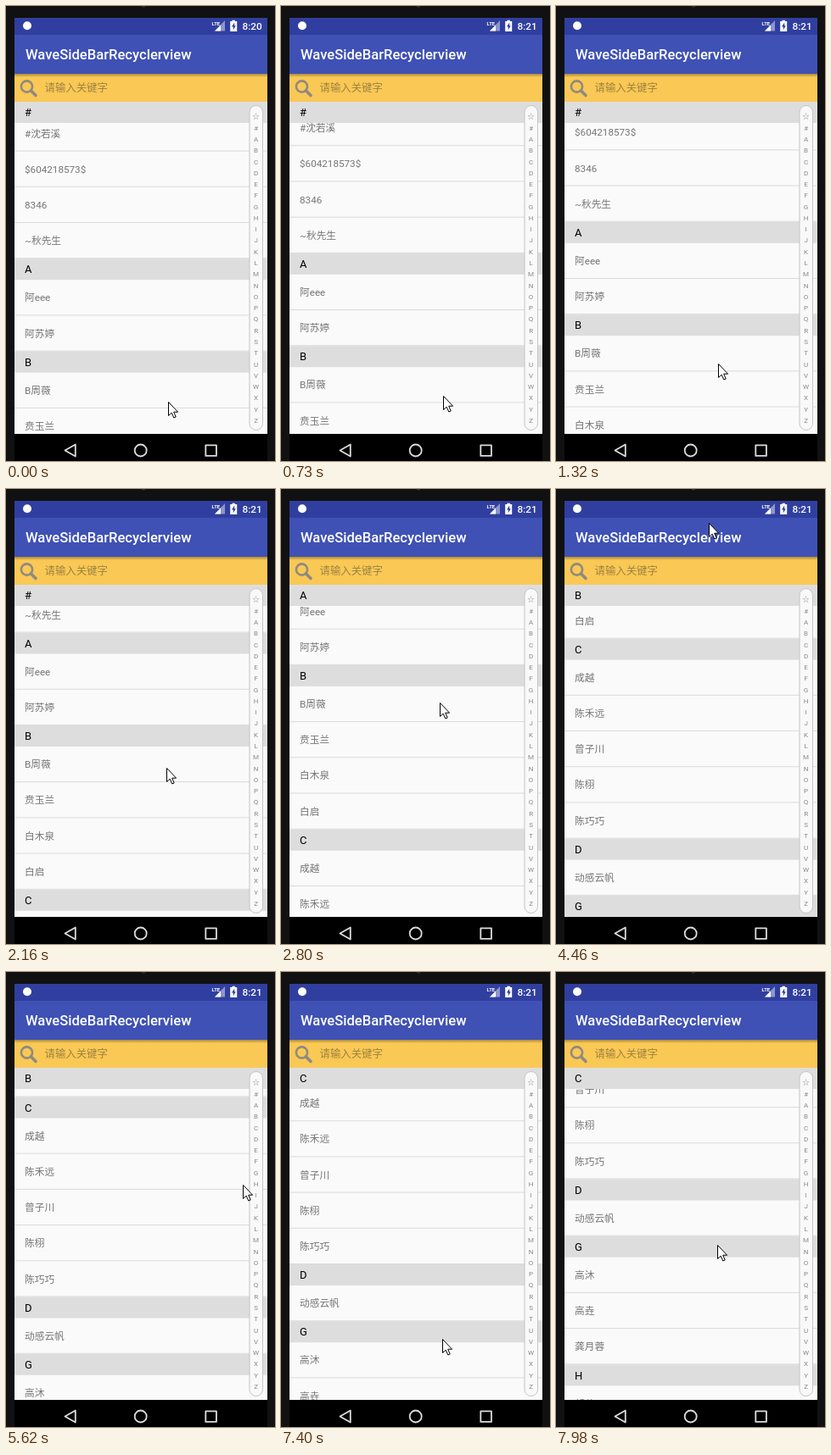
Animation, 317 px wide and 537 px high, one loop 8000 ms. Source, as an HTML page:

```html
<!DOCTYPE html>
<html lang="zh">
<head>
<meta charset="utf-8">
<title>WaveSideBarRecyclerview</title>
<style>
  html, body { margin: 0; height: 100%; overflow: hidden; background: #111; }
  svg { display: block; width: 100%; height: 100%; font-family: Roboto, "Noto Sans CJK SC", "Noto Sans CJK", sans-serif; }
  .row { font-size: 11.7px; fill: #757575; }
  .head { font-size: 13px; fill: #000; }
  .side { font-size: 8px; fill: #888; text-anchor: middle; }
</style>
</head>
<body>
<svg viewBox="0 0 317 537">
  <defs>
    <clipPath id="clip"><rect x="10" y="113" width="298" height="392"/></clipPath>
    <linearGradient id="shade" x2="0" y2="1">
      <stop stop-color="#5a4a20" stop-opacity=".5"/>
      <stop offset="1" stop-color="#5a4a20" stop-opacity="0"/>
    </linearGradient>
  </defs>
  <rect width="317" height="537" fill="#111"/>
  <circle cx="162" cy="-1" r="2.5" fill="#333"/>

  <!-- status bar and toolbar -->
  <rect x="10" y="14" width="298" height="20" fill="#303f9f"/>
  <rect x="10" y="34" width="298" height="46" fill="#3f51b5"/>
  <g fill="#fff">
    <circle cx="25" cy="23.3" r="5"/>
    <path d="M258 17V29.5H246Z" fill-opacity=".45"/>
    <path d="M253 22.5V29.5H246Z"/>
    <text x="242.5" y="22.5" font-size="6" font-weight="700">LTE</text>
    <path d="M266.5 18v-1.2h3.4V18h2.3v12h-8V18z"/>
    <path d="M269.2 19.5l-3.2 5h1.8v3.8l3-5h-1.6z" fill="#303f9f"/>
    <text id="clock" x="278.5" y="28" font-size="11.8" font-weight="500">8:20</text>
    <text x="23" y="63" font-size="16.6" font-weight="500">WaveSideBarRecyclerview</text>
  </g>

  <!-- search field -->
  <rect x="10" y="80" width="298" height="33" fill="#f9c855"/>
  <rect x="10" y="80" width="298" height="4" fill="url(#shade)"/>
  <g fill="none" stroke="#8f8a80">
    <circle cx="24.5" cy="95" r="6.6" stroke-width="2.6"/>
    <path d="M29.5 100l5.5 5.5" stroke-width="3.6" stroke-linecap="round"/>
  </g>
  <text x="45.5" y="101.4" font-size="12.4" fill="#9d8240">请输入关键字</text>

  <!-- contact list -->
  <g clip-path="url(#clip)">
    <rect x="10" y="113" width="298" height="392" fill="#fafafa"/>
    <g id="list"></g>
    <g id="pin"></g>
  </g>
  <rect x="287" y="117.5" width="15.5" height="383" rx="7.75" fill="#f9f9f9" stroke="#c4c4c4"/>
  <g id="side"></g>

  <!-- navigation bar -->
  <rect x="10" y="505" width="298" height="32" fill="#000"/>
  <g fill="none" stroke="#dcdcdc" stroke-width="1.8" stroke-linejoin="round">
    <path d="M81.8 517.5v14L69.5 524.5z"/>
    <circle cx="158.7" cy="524.5" r="7"/>
    <rect x="235.3" y="518.3" width="12.6" height="12.6"/>
  </g>
  <path id="cursor" d="M.5 .5V16.5L4.2 13.2 6.8 19 9.2 18 6.7 12.2H11.6Z" fill="#fff" stroke="#000"/>
</svg>
<script>
const $ = id => document.getElementById(id);
const LOOP = 8000, TOP = 113, ROW = 42.2, HEAD = 25;
const groups = {
  '#': ['#沈若溪', '$604218573$', '8346', '~秋先生'],
  A: ['阿eee', '阿苏婷'],
  B: ['B周薇', '贲玉兰', '白木泉', '白启'],
  C: ['成越', '陈禾远', '曾子川', '陈栩', '陈巧巧'],
  D: ['动感云帆'],
  G: ['高沐', '高垚', '龚月蓉'],
  H: ['胡芷']
};

// Keys: [ms, scroll] and [ms, x, y]
const scrollKeys = [
  [0, 8.6], [650, 15], [1317, 52], [2799, 208.3], [3742, 340], [4420, 434],
  [4954, 462.5], [6900, 462.5], [7396, 501], [7942, 601.5], [LOOP, 601.5]
];
const cursorKeys = [
  [0, 191, 467], [650, 191, 460], [1317, 191, 422], [2799, 187, 252], [3742, 182, 127],
  [4340, 180, 51], [4700, 178, 0], [4900, 178, -25], [5619, 178, -25],
  [5620, 279, 251], [6166, 174, 434], [6440, 174, 434], [6800, 190, 473],
  [6900, 190, 473], [7396, 190, 433], [7942, 190, 322], [LOOP, 190, 322]
];

const label = (cls, x, y, s) => `<text class="${cls}" x="${x}" y="${y}">${s}</text>`;
const header = (y, s) =>
  `<rect x="10" y="${y}" width="298" height="${HEAD}" fill="#ddd"/>` + label('head', 22, y + 17.2, s);

const heads = [];
let y = TOP, html = '';
for (const [key, names] of Object.entries(groups)) {
  heads.push({ key, y: y - TOP });
  html += header(y, key);
  y += HEAD;
  for (const name of names) {
    html += label('row', 22, y + 25.2, name) +
      `<rect x="10" y="${y + ROW - 1}" width="298" height="1" fill="#dadada"/>`;
    y += ROW;
  }
}
$('list').innerHTML = html;
$('side').innerHTML = [...'☆#ABCDEFGHIJKLMNOPQRSTUVWXYZ']
  .map((c, i) => label('side', 294.6, 133.4 + i * 13.28, c)).join('');

function at(keys, t) {
  const i = Math.max(1, keys.findIndex(k => k[0] >= t));
  const a = keys[i - 1], b = keys[i], p = (t - a[0]) / (b[0] - a[0]);
  return a.slice(1).map((v, j) => v + (b[j + 1] - v) * p);
}

// The screen refreshes about seven times a second
function tick(t) {
  if (t < 105) return 0;
  const [start, step] = t < 5620 ? [105, 134.7] : [5620, 136.6];
  return start + Math.floor((t - start) / step) * step;
}

let pinned;
function draw(now) {
  const t = tick(now % LOOP);
  const [scroll] = at(scrollKeys, t);
  const [x, y] = at(cursorKeys, t);
  $('list').setAttribute('transform', `translate(0 ${-scroll})`);
  $('cursor').setAttribute('transform', `translate(${Math.round(x)} ${Math.round(y)})`);
  $('clock').textContent = t < 600 ? '8:20' : '8:21';

  // The next header pushes the pinned one out
  const next = heads.findIndex(h => h.y > scroll);
  const { key } = heads[next - 1];
  if (key !== pinned) $('pin').innerHTML = header(TOP, pinned = key);
  $('pin').setAttribute('transform', `translate(0 ${Math.min(0, heads[next].y - scroll - HEAD)})`);
  requestAnimationFrame(draw);
}
requestAnimationFrame(draw);
</script>
</body>
</html>
```
